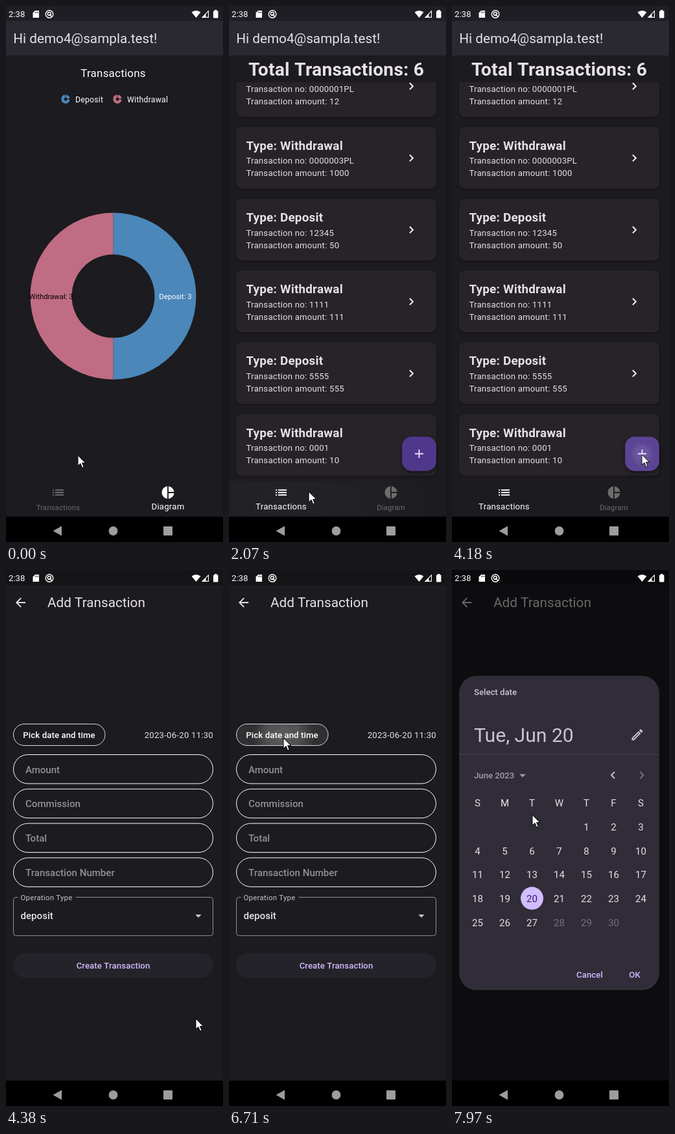
These frames come from a looping animation (335 by 823 pixels, 7.99 s). An HTML page with a canvas:

```html
<!DOCTYPE html>
<html lang="en">
<head>
<meta charset="utf-8">
<title>Transactions app</title>
<style>
html, body { margin: 0; width: 100%; height: 100%; overflow: hidden; background: #1c1b1f; }
canvas { display: block; width: 335px; height: 823px; }
</style>
</head>
<body>
<canvas id="stage" width="335" height="823"></canvas>
<script>
const c = document.getElementById('stage').getContext('2d');
const LOOP = 7990, DP = 0.942, W = 335, NAV_TOP = 784;
const BODY_SPACING = 0.25 * DP;
const SURFACE = '#1c1b1f', INK = '#e6e1e5', MUTED = '#cac4d0', LILAC = '#d0bcff';
const BLUE = '#4b87b9', ROSE = '#c06c84';
const SWITCH = 1540, PAGE = 4210, DIALOG = 6760;

const icons = Object.fromEntries(Object.entries({
  list: 'M3 13h2v-2H3zm0 4h2v-2H3zm0-8h2V7H3zm4 4h14v-2H7zm0 4h14v-2H7zM7 7v2h14V7z',
  pie: 'M11 2v20c-5.07-.5-9-4.79-9-10s3.93-9.5 9-10zm2.03 0v8.99H22c-.47-4.74-4.24-8.52-8.97-8.99zm0 11.01V22c4.74-.47 8.5-4.25 8.97-8.99z',
  right: 'M10 6L8.59 7.41 13.17 12l-4.58 4.59L10 18l6-6z',
  left: 'M15.41 7.41L14 6l-6 6 6 6 1.41-1.41L10.83 12z',
  back: 'M20 11H7.83l5.59-5.59L12 4l-8 8 8 8 1.41-1.41L7.83 13H20z',
  add: 'M19 13h-6v6h-2v-6H5v-2h6V5h2v6h6z',
  drop: 'M7 10l5 5 5-5z',
  edit: 'M14.06 9.02l.92.92L5.92 19H5v-.92zM17.66 3c-.25 0-.51.1-.7.29l-1.83 1.83 3.75 3.75 1.83-1.83c.39-.39.39-1.02 0-1.41l-2.34-2.34c-.2-.2-.45-.29-.71-.29zm-3.6 3.19L3 17.25V21h3.75L17.81 9.94z'
}).map(([name, d]) => [name, new Path2D(d)]));
const arrow = new Path2D('M0 0V16L4 12.6L6.6 19L9.2 18L6.6 11.7H11.7Z');

// time, x, y
const pointer = [
  [0, 111, 690], [300, 111, 690], [1000, 89, 753], [1150, 86, 757], [1700, 86, 757],
  [1900, 88, 755], [2670, 246, 713], [3010, 270, 700], [3490, 291, 691], [3780, 293, 688],
  [4400, 293, 689], [4740, 290, 684], [5560, 126, 318], [5950, 74, 247], [6300, 84, 258],
  [6800, 84, 258], [7460, 112, 323], [7970, 124, 376]
];

const progress = (t, start, length) => Math.min(1, Math.max(0, (t - start) / length));
const easeOut = p => 1 - (1 - p) ** 3;
const mix = (a, b, p) => a + (b - a) * p;

function rect(x, y, w, h, color) {
  c.fillStyle = color;
  c.fillRect(x, y, w, h);
}

function roundPath(x, y, w, h, r) {
  c.beginPath();
  c.roundRect(x, y, w, h, r);
}

function box(x, y, w, h, r, fill, stroke) {
  roundPath(x, y, w, h, r);
  if (fill) { c.fillStyle = fill; c.fill(); }
  if (stroke) { c.strokeStyle = stroke; c.lineWidth = 1; c.stroke(); }
}

function raisedBox(x, y, w, h, r, fill, blur, drop) {
  c.save();
  c.shadowColor = 'rgba(0,0,0,.4)';
  c.shadowBlur = blur;
  c.shadowOffsetY = drop;
  box(x, y, w, h, r, fill);
  c.restore();
}

function poly(color, ...points) {
  c.beginPath();
  points.forEach(([x, y]) => c.lineTo(x, y));
  c.closePath();
  c.fillStyle = color;
  c.fill();
}

function disc(x, y, r, color) {
  c.beginPath();
  c.arc(x, y, r, 0, 7);
  c.fillStyle = color;
  c.fill();
}

// y is the middle of the capitals; size is in dp
function text(s, x, y, size, color = INK, { weight = 400, align = 'left', spacing = 0 } = {}) {
  const px = size * DP;
  c.font = `${weight} ${px}px Roboto, sans-serif`;
  c.letterSpacing = `${spacing}px`;
  c.textAlign = align;
  c.fillStyle = color;
  c.fillText(s, x, y + px * 0.355);
}

function icon(name, x, y, color, scale = DP) {
  c.save();
  c.translate(x, y);
  c.scale(scale, scale);
  c.translate(-12, -12);
  c.fillStyle = color;
  c.fill(icons[name]);
  c.restore();
}

function ripple(x, y, r, alpha, sparkle = 0) {
  const g = c.createRadialGradient(x, y, 0, x, y, r);
  g.addColorStop(0, `rgba(255,255,255,${alpha})`);
  g.addColorStop(0.55, `rgba(255,255,255,${alpha * 0.7})`);
  g.addColorStop(1, 'rgba(255,255,255,0)');
  c.fillStyle = g;
  c.fillRect(x - r, y - r, 2 * r, 2 * r);
  for (let i = 0; i < sparkle; i++) {
    const a = i * 2.4, d = r * (0.45 + 0.5 * ((i * 0.618) % 1));
    rect(Math.round(x + d * Math.cos(a)), Math.round(y + d * Math.sin(a)), 1, 1, `rgba(255,255,255,${alpha * 0.5})`);
  }
}

function clipped(path, draw) {
  c.save();
  path();
  c.clip();
  draw();
  c.restore();
}

function statusBar() {
  rect(0, 0, W, 23, 'rgba(0,0,0,.25)');
  text('2:38', 4, 12.5, 14, '#fff');
  poly('#fff', [45, 7], [51, 7], [51, 18], [41.5, 18], [41.5, 10.5]);
  [45, 47, 49].forEach(x => rect(x, 8.5, 1, 2.5, '#444'));
  c.strokeStyle = '#fff';
  c.lineWidth = 1.4;
  c.beginPath();
  c.arc(67, 12.5, 5.8, 0, 7);
  c.moveTo(69.3, 12);
  c.arc(66.8, 12, 2.5, 0, 7);
  c.moveTo(67, 12.5);
  c.lineTo(71, 16.5);
  c.stroke();
  c.beginPath();
  c.moveTo(293.5, 18);
  c.lineTo(286.5, 9.5);
  c.quadraticCurveTo(293.5, 4.5, 300.5, 9.5);
  c.fillStyle = '#fff';
  c.fill();
  c.lineWidth = 1.1;
  c.beginPath();
  c.moveTo(303, 17.4);
  c.lineTo(312.5, 17.4);
  c.lineTo(312.5, 7.8);
  c.closePath();
  c.stroke();
  poly('#fff', [303, 17.4], [308.5, 17.4], [308.5, 12]);
  box(320, 7.5, 7.5, 11, 1, '#fff');
  rect(322, 6, 3.5, 2, '#fff');
}

function systemNav() {
  rect(0, NAV_TOP, W, 39, '#000');
  poly('#9d9d9d', [72.5, 806], [86, 798.5], [86, 813.5]);
  disc(165.5, 806, 6.9, '#9d9d9d');
  box(243, 799, 14, 14, 1, '#9d9d9d');
}

function slice(from, to, color) {
  c.beginPath();
  c.arc(165.5, 445.5, 128, from, to);
  c.arc(165.5, 445.5, 64, to, from, true);
  c.fillStyle = color;
  c.fill();
}

function legend(x, label, color) {
  c.strokeStyle = color;
  c.lineWidth = 4.2;
  [[0.1, 4.6], [4.8, 6.1]].forEach(([from, to]) => {
    c.beginPath();
    c.arc(x, 143, 4.6, from, to);
    c.stroke();
  });
  text(label, x + 15, 143.5, 13, '#fff', { spacing: BODY_SPACING });
}

function chart() {
  text('Transactions', 165.5, 103, 18, '#fff', { align: 'center', spacing: BODY_SPACING });
  legend(92, 'Deposit', BLUE);
  legend(172, 'Withdrawal', ROSE);
  slice(-Math.PI / 2, Math.PI / 2, BLUE);
  slice(Math.PI / 2, Math.PI * 1.5, ROSE);
  text('Withdrawal: 3', 69.5, 446, 12, '#000', { align: 'center' });
  text('Deposit: 3', 261.5, 446, 12, '#fff', { align: 'center' });
}

const records = [
  ['Deposit', '0000001PL', 12], ['Withdrawal', '0000003PL', 1000], ['Deposit', '12345', 50],
  ['Withdrawal', '1111', 111], ['Deposit', '5555', 555], ['Withdrawal', '0001', 10]
];

function recordList(t) {
  const spacing = BODY_SPACING;
  clipped(() => { c.beginPath(); c.rect(0, 117, W, 612); }, () => {
    records.forEach(([type, number, amount], i) => {
      const y = 75.2 + 110.25 * i;
      raisedBox(11, y, 309, 95, 8, '#272328', 3, 1);
      text('Type: ' + type, 26.4, y + 28.5, 20, INK, { weight: 700, spacing });
      text('Transaction no: ' + number, 26.4, y + 52.3, 14, INK, { spacing });
      text('Transaction amount: ' + amount, 26.4, y + 71.2, 14, INK, { spacing });
      icon('right', 281.5, y + 48, '#fff');
    });
  });
  text('Total Transactions: 6', 165.5, 97, 30, INK, { weight: 700, align: 'center', spacing });

  const fab = [267.2, 661.2, 52.7, 52.7];
  raisedBox(...fab, 15, '#4f378b', 6, 3);
  if (t > 3970) {
    const p = progress(t, 3970, 250);
    clipped(() => roundPath(...fab, 15), () => {
      rect(...fab, `rgba(234,221,255,${0.09 * p})`);
      ripple(293.5, 688, mix(6, 22, p), 0.14 * p, 40);
    });
  }
  icon('add', 293.5, 687.5, '#eaddff');
}

function tab(x, name, label, on) {
  const gray = mix(108, 255, on), color = `rgb(${gray},${gray},${gray})`, size = mix(12, 14, on);
  icon(name, x, 747, color);
  text(label, x, mix(769.5, 768.5, on), size, color, { align: 'center', spacing: BODY_SPACING * size / 14 });
}

function home(t) {
  rect(0, 0, W, NAV_TOP, SURFACE);
  rect(0, 0, W, 76, '#2a2831');
  text('Hi demo4@sampla.test!', 11.3, 50, 22);
  t < SWITCH ? chart() : recordList(t);
  const on = easeOut(progress(t, SWITCH + 60, 200));
  if (t > 1500 && t < 3400) {
    const p = progress(t, 1500, 420);
    clipped(() => { c.beginPath(); c.rect(0, 729, W, 55); }, () =>
      ripple(84, 757, mix(12, 250, p ** 1.5), mix(0.15, 0.03, p), p < 0.5 ? 30 : 0));
  }
  tab(80.5, 'list', 'Transactions', on);
  tab(250, 'pie', 'Diagram', 1 - on);
}

function form(t) {
  rect(0, 0, W, NAV_TOP, SURFACE);
  icon('back', 22.5, 50, INK);
  text('Add Transaction', 64, 50, 22);
  if (t > 6470) {
    const p = progress(t, 6470, 240);
    clipped(() => roundPath(11.5, 236.5, 141.5, 33, 16.5), () => {
      rect(11, 236, 143, 34, `rgba(255,255,255,${0.09 * p})`);
      ripple(84, 253, mix(18, 48, p), mix(0.1, 0.22, p), 90);
    });
  }
  box(11.5, 236.5, 141.5, 33, 16.5, null, '#dcdadd');
  text('Pick date and time', 82, 253.5, 14, '#fff', { weight: 500, align: 'center', spacing: 0.1 });
  text('2023-06-20 11:30', 320, 253.5, 14, INK, { align: 'right', spacing: BODY_SPACING });
  ['Amount', 'Commission', 'Total', 'Transaction Number'].forEach((label, i) => {
    const y = 283.5 + 52.8 * i;
    box(11.5, y, 308, 44.5, 22.2, null, '#fff');
    text(label, 30, y + 22.8, 16, '#929094', { weight: 500 });
  });
  box(11.5, 502.5, 308, 59, 4, null, '#938f99');
  rect(18.5, 500, 89, 5, SURFACE);
  text('Operation Type', 22.5, 502.5, 12, MUTED, { spacing: 0.3 });
  text('deposit', 22.5, 531, 16, INK, { weight: 500 });
  icon('drop', 297, 531, MUTED);
  box(11, 588, 309, 38, 19, '#25232a');
  text('Create Transaction', 165.5, 607.5, 14, LILAC, { weight: 500, align: 'center', spacing: 0.1 });
}

function datePicker() {
  box(11, 162.5, 309, 482.5, 26.4, '#302d38');
  text('Select date', 34, 187.5, 14, MUTED, { weight: 500 });
  text('Tue, Jun 20', 34, 253.5, 32, MUTED);
  icon('edit', 286, 253, MUTED);
  rect(11, 282.5, 309, 1, '#49454f');
  text('June 2023', 34, 315.5, 14, '#a29ea8', { weight: 500 });
  icon('drop', 109, 315.5, '#a29ea8');
  icon('left', 248.5, 315, MUTED);
  icon('right', 293, 315, '#77737d');
  const column = i => 39.5 + 42 * i, centered = { align: 'center' };
  [...'SMTWTFS'].forEach((day, i) => text(day, column(i), 357.5, 16, INK, centered));
  for (let day = 1; day <= 30; day++) {
    const x = column((day + 3) % 7), y = 394 + 36.7 * Math.floor((day + 3) / 7);
    if (day === 20) disc(x, y, 17.5, LILAC);
    text(day, x, y + 0.5, 16, day === 20 ? '#381e72' : day > 27 ? '#74707a' : INK, centered);
  }
  text('Cancel', 212.5, 621, 14, LILAC, { weight: 500, align: 'center', spacing: 0.1 });
  text('OK', 282, 621, 14, LILAC, { weight: 500, align: 'center', spacing: 0.1 });
}

function cursor(t) {
  let i = pointer.findIndex(k => k[0] > t);
  if (i < 0) i = pointer.length - 1;
  const [t0, x0, y0] = pointer[i - 1], [t1, x1, y1] = pointer[i];
  const p = progress(t, t0, t1 - t0);
  c.save();
  c.translate(mix(x0, x1, p), mix(y0, y1, p));
  c.fillStyle = '#fff';
  c.strokeStyle = '#000';
  c.lineWidth = 1;
  c.fill(arrow);
  c.stroke(arrow);
  c.restore();
}

function render(t) {
  const page = easeOut(progress(t, PAGE, 170)), dialog = progress(t, DIALOG, 150);
  c.globalAlpha = 1;
  if (page < 1) home(t);
  if (page > 0) {
    const s = mix(0.9, 1, page);
    c.save();
    c.globalAlpha = page;
    c.translate(W / 2, NAV_TOP / 2);
    c.scale(s, s);
    c.translate(-W / 2, -NAV_TOP / 2);
    form(t);
    c.restore();
  }
  if (dialog > 0) {
    rect(0, 0, W, NAV_TOP, `rgba(0,0,0,${0.54 * dialog})`);
    c.globalAlpha = dialog;
    datePicker();
    c.globalAlpha = 1;
  }
  statusBar();
  systemNav();
  cursor(t);
}

const start = performance.now();
function tick() {
  render((performance.now() - start) % LOOP);
  requestAnimationFrame(tick);
}
tick();
</script>
</body>
</html>
```
